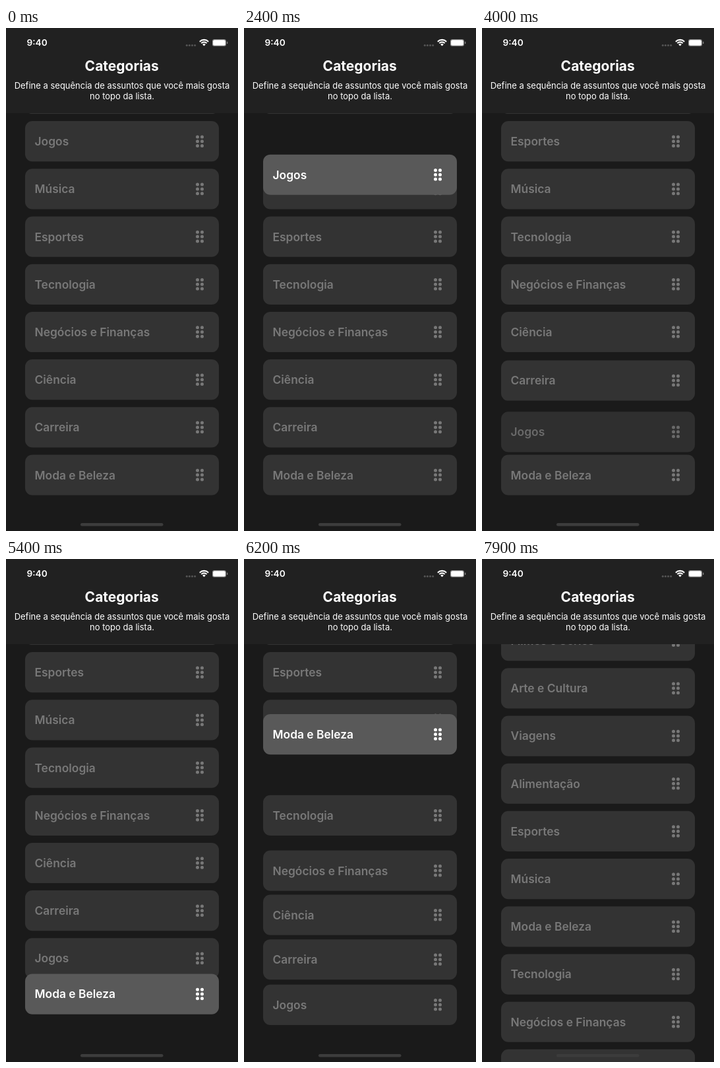
An HTML page with a canvas for the animation above (8 s loop, 352 by 762 pixels).

```html
<!DOCTYPE html>
<html lang="pt">
<head>
<meta charset="utf-8">
<title>Categorias</title>
<style>
  html, body { margin: 0; width: 100%; height: 100%; overflow: hidden; background: #1a1a1a; }
  canvas { display: block; width: 352px; height: 762px; }
</style>
</head>
<body>
<canvas id="stage" width="352" height="762"></canvas>
<script>
const ctx = document.getElementById('stage').getContext('2d');
const LOOP = 8000, STEP = 100, TOP = 171.7, PITCH = 72.2;
const FIRST_SLOT = -4, PINNED_SLOT = 1;

const rows = [
  'Filmes e Séries', 'Arte e Cultura', 'Viagens', 'Alimentação', 'Jogos', 'Música', 'Esportes',
  'Tecnologia', 'Negócios e Finanças', 'Ciência', 'Carreira', 'Moda e Beleza'
].map((label, i) => ({ label, slot: i + FIRST_SLOT, moves: [] }));

// path: [time, slot] points of the held card
const drags = [
  { from: 0, to: 6, lift: 1600, drop: 3900,
    path: [[2200, 0], [2600, 1.4], [2647, 3.5], [2900, 3.91], [3060, 6.13]] },
  { from: 7, to: 2, lift: 4600, drop: 6500,
    path: [[5100, 7], [5400, 6.75], [5525, 6.5], [5680, 3.5], [5950, 2.5], [6200, 1.3], [6300, 1.15]] }
];

const clamp = u => Math.min(1, Math.max(0, u));
const gray = v => `rgb(${v},${v},${v})`;

function ramp(t, start, duration) {
  const u = clamp((t - start) / duration);
  return u * u * (3 - 2 * u);
}

// Reads a path along one axis: time to slot, or slot to time
function along(path, value, a = 0, b = 1) {
  for (let i = 1; i < path.length; i++) {
    const p = path[i - 1], q = path[i];
    const u = (value - p[a]) / (q[a] - p[a]);
    if (u <= 1 || i === path.length - 1) return p[b] + (q[b] - p[b]) * clamp(u);
  }
}

// Each card that the held one passes springs into the slot left empty
function planMoves() {
  const order = new Map(rows.map(row => [row.slot, row]));
  for (const drag of drags) {
    const { from, to, path } = drag;
    const dir = Math.sign(to - from);
    const held = order.get(from);
    let empty = from;
    for (let slot = from + dir; slot !== to + dir; slot += dir) {
      if (slot === PINNED_SLOT) continue;
      const row = order.get(slot);
      const shift = empty - slot;
      const start = along(path, slot - dir / 2, 1, 0) + 50 * (Math.abs(shift) - 1);
      row.moves.push({ start, shift });
      order.set(empty, row);
      empty = slot;
    }
    order.set(empty, held);
    held.drag = drag;
  }
  rows.sort((a, b) => Boolean(a.drag) - Boolean(b.drag));
}

// Underdamped spring from 0 to 1
function spring(ms) {
  if (ms <= 0) return 0;
  if (ms > 1044) return 1;
  const angle = ms * .0079, damping = .424;
  return 1 - Math.exp(-damping * angle) * (Math.cos(angle) + damping * Math.sin(angle));
}

function rowY({ slot, moves, drag }, t) {
  if (drag) {
    const held = along(drag.path, t);
    slot = held + (drag.to - held) * ramp(t, drag.drop, 300);
  }
  for (const { start, shift } of moves) slot += shift * spring(t - start);
  return TOP + slot * PITCH + 242.5 * ramp(t, 6950, 1000);
}

function rowGlow({ drag }, t) {
  if (!drag) return 0;
  const { lift, drop } = drag;
  const dip = .12 * Math.sin(Math.PI * clamp((t - drop) / 300));
  return ramp(t, lift, 220) - ramp(t, drop - 300, 300) - dip;
}

function box(x, y, w, h, r, color) {
  ctx.fillStyle = color;
  ctx.beginPath();
  ctx.roundRect(x, y, w, h, r);
  ctx.fill();
}

function dot(x, y, r, color) {
  box(x - r, y - r, 2 * r, 2 * r, r, color);
}

function text(str, x, y, weight, size, color = '#fff', align = 'left') {
  ctx.font = `${weight} ${size}px Inter, sans-serif`;
  ctx.textAlign = align;
  ctx.fillStyle = color;
  ctx.fillText(str, x, y);
}

function drawRow(row, t) {
  const y = rowY(row, t);
  const glow = rowGlow(row, t);
  const ink = gray(120 + 135 * glow);
  box(29, y - 30.6, 294, 61.2, 11, gray(51 + 38 * glow));
  text(row.label, 43.5, y + 6.4, 600, 17.4, ink);
  for (let i = 0; i < 6; i++) {
    dot(290.5 + 7 * (i % 2), y + 6.8 * (Math.floor(i / 2) - 1), 2.5, ink);
  }
}

function wifiArc(radius) {
  ctx.beginPath();
  ctx.arc(300.5, 27.3, radius, -Math.PI * .75, -Math.PI * .25);
}

function drawStatusBar() {
  text('9:40', 31.5, 27, 600, 13.7);
  for (let i = 0; i < 4; i++) dot(274.3 + 4.1 * i, 26.2, 1.5, '#555');

  ctx.strokeStyle = '#fff';
  ctx.lineWidth = 2.1;
  for (const radius of [9.4, 5.9]) {
    wifiArc(radius);
    ctx.stroke();
  }
  ctx.fillStyle = '#fff';
  wifiArc(3.4);
  ctx.lineTo(300.5, 27.3);
  ctx.fill();

  box(313, 17, 21, 10.6, 3.2, '#8a8a8a');
  box(314.2, 18.2, 18.6, 8.2, 2, '#fff');
  box(335, 20.5, 1.3, 3.6, .6, '#8a8a8a');
}

function drawHeader() {
  box(0, 0, 352, 129, 0, '#212121');
  drawStatusBar();
  text('Categorias', 175.7, 65, 700, 21, '#fff', 'center');
  text('Define a sequência de assuntos que você mais gosta', 176, 92, 400, 13, '#fff', 'center');
  text('no topo da lista.', 176, 108, 400, 13, '#fff', 'center');
}

function draw(now) {
  const t = Math.floor(now % LOOP / STEP) * STEP;
  box(0, 0, 352, 762, 0, '#1a1a1a');
  for (const row of rows) drawRow(row, t);
  drawHeader();
  box(113, 750, 125.5, 4.5, 2.25, '#3c3c3c');
  requestAnimationFrame(draw);
}

planMoves();
requestAnimationFrame(draw);
</script>
</body>
</html>
```
